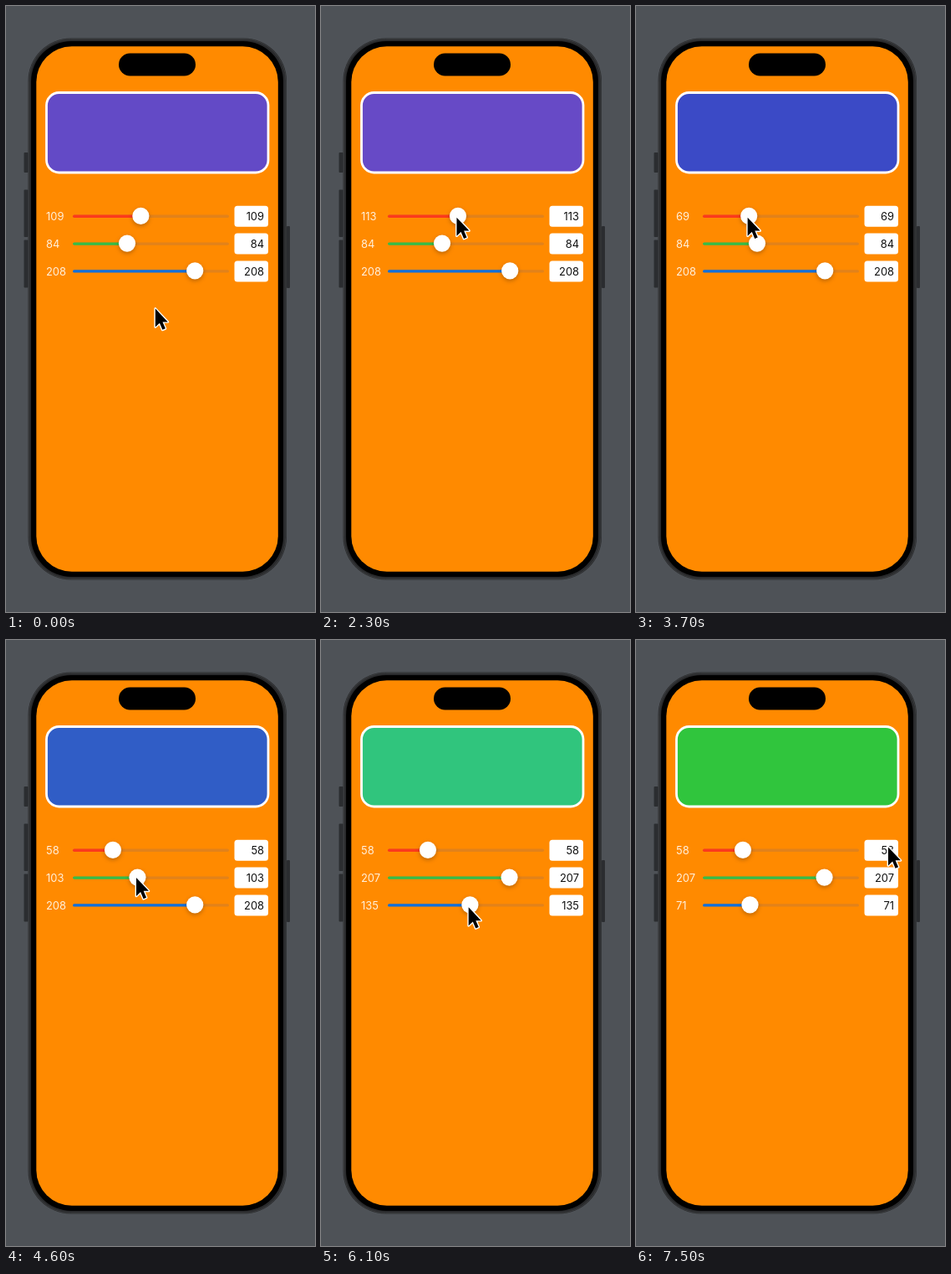
Recreate the animation shown at these times as an HTML page. Size 370 by 724 pixels, loop 8000 ms.

```html
<!DOCTYPE html>
<html lang="en">
<head>
<meta charset="utf-8">
<title>Colour mixer</title>
<style>
  html, body { margin: 0; width: 100%; height: 100%; overflow: hidden; background: #4e5257; }
  svg { display: block; width: 370px; height: 724px; }
  text { font: 400 12.9px Inter, "Liberation Sans", sans-serif; }
  .label { fill: #fff0dc; }
  .value { fill: #111; text-anchor: end; }
  .knob { fill: #fff; filter: drop-shadow(0 2px 2.5px rgba(0, 0, 0, .26)); }
</style>
</head>
<body>
<svg viewBox="0 0 370 724" xmlns="http://www.w3.org/2000/svg">
  <g fill="#2b2d30">
    <rect x="21.5" y="175" width="5" height="24" rx="1"/>
    <rect x="21.5" y="219.5" width="5" height="56.5" rx="1"/>
    <rect x="21.5" y="279.5" width="5" height="57" rx="1"/>
    <rect x="336" y="263" width="4" height="74" rx="1"/>
  </g>
  <rect x="26.5" y="38.5" width="309.5" height="647" rx="51" fill="#292a2c"/>
  <rect x="27.5" y="39.5" width="307.5" height="645" rx="50" fill="none" stroke="#3a3c3e"/>
  <rect x="30" y="42" width="302" height="640" rx="48" fill="#000"/>
  <rect x="36.3" y="48.2" width="289.5" height="627.6" rx="42.5" fill="#ff8a00"/>
  <rect x="135" y="56.5" width="92" height="27" rx="13.5" fill="#000"/>
  <rect id="swatch" x="48.5" y="103.5" width="265.5" height="95.5" rx="15" stroke="#fff" stroke-width="2.8"/>
  <g id="rows"></g>
  <path id="cursor" d="M0 0V20.5L4.8 16L8 23.6L11.3 22.2L8.1 14.8H14Z"
    fill="#000" stroke="#fff" stroke-width="2.6" stroke-linejoin="round" paint-order="stroke"/>
</svg>
<script>
const LOOP = 8000, STEP = 100;

const sliders = [
  { color: '#fb3a1c', start: 109 },
  { color: '#35bd48', start: 84 },
  { color: '#1070dc', start: 208 }
];
sliders.forEach((s, i) => { s.y = 251.2 + i * 32.8; });

const smooth = p => p * p * (3 - 2 * p);
const easeOut = p => 1 - (1 - p) ** 2;
const mix = (a, b, p) => a + (b - a) * p;
const knobX = v => 90 + v * 167 / 255;

// Each helper returns a step that changes the state as p runs from 0 to 1
const step = (from, to, run, ease = smooth) => ({ from, to, run, ease });

const move = (from, to, x, y) => step(from, to, (st, p) => {
  st.x = mix(st.x, x, p);
  st.y = mix(st.y, y, p);
});

const grab = (from, to, i, dy) => step(from, to, (st, p) => {
  st.x = mix(st.x, knobX(st.values[i]) - 1.6, p);
  st.y = mix(st.y, sliders[i].y + dy, p);
});

const drag = (from, to, i, value, ease) => step(from, to, (st, p) => {
  const v = mix(st.values[i], value, p);
  st.x += knobX(v) - knobX(st.values[i]);
  st.values[i] = v;
}, ease);

const script = [
  move(900, 1600, 204.6, 244.5),
  grab(1600, 2100, 0, 1.5),
  drag(2200, 2900, 0, 183),
  drag(2900, 3880, 0, 58),
  grab(4000, 4400, 1, 0),
  drag(4400, 5200, 1, 207),
  grab(5300, 5700, 2, 2.5),
  drag(5800, 6745, 2, 71, easeOut),
  move(6800, 7150, 318, 322),
  move(7150, 7500, 302, 247.5)
];

function stateAt(t) {
  const st = { x: 178.8, y: 361.6, values: sliders.map(s => s.start) };
  for (const s of script) {
    if (t > s.from) s.run(st, s.ease(Math.min(1, (t - s.from) / (s.to - s.from))));
  }
  return st;
}

const $ = id => document.getElementById(id);

function add(tag, attrs) {
  const el = document.createElementNS('http://www.w3.org/2000/svg', tag);
  for (const k in attrs) el.setAttribute(k, attrs[k]);
  return $('rows').appendChild(el);
}

for (const s of sliders) {
  const bar = { x: 80, y: s.y - 1.6, height: 3.4, rx: 1.7 };
  add('rect', { ...bar, width: 187, fill: '#e2821a' });
  s.fill = add('rect', { ...bar, fill: s.color });
  s.knob = add('circle', { class: 'knob', r: 10.1, cy: s.y - 0.4 });
  s.label = add('text', { class: 'label', x: 48, y: s.y + 4.7 });
  add('rect', { x: 273.5, y: s.y - 12.4, width: 40.5, height: 25, rx: 3.5, fill: '#fff' });
  s.value = add('text', { class: 'value', x: 309, y: s.y + 4.7 });
}

function draw(t) {
  const { x, y, values } = stateAt(t);
  const rgb = sliders.map((s, i) => {
    const v = Math.round(values[i]), kx = knobX(v);
    s.fill.setAttribute('width', kx - 80);
    s.knob.setAttribute('cx', kx);
    s.label.textContent = s.value.textContent = v;
    return v - 10;
  });
  $('swatch').setAttribute('fill', `rgb(${rgb})`);
  $('cursor').setAttribute('transform', `translate(${x} ${y}) scale(1.07)`);
}

const start = performance.now();
function tick() {
  const t = (performance.now() - start) % LOOP;
  draw(Math.floor(t / STEP) * STEP);
  requestAnimationFrame(tick);
}
tick();
</script>
</body>
</html>
```
